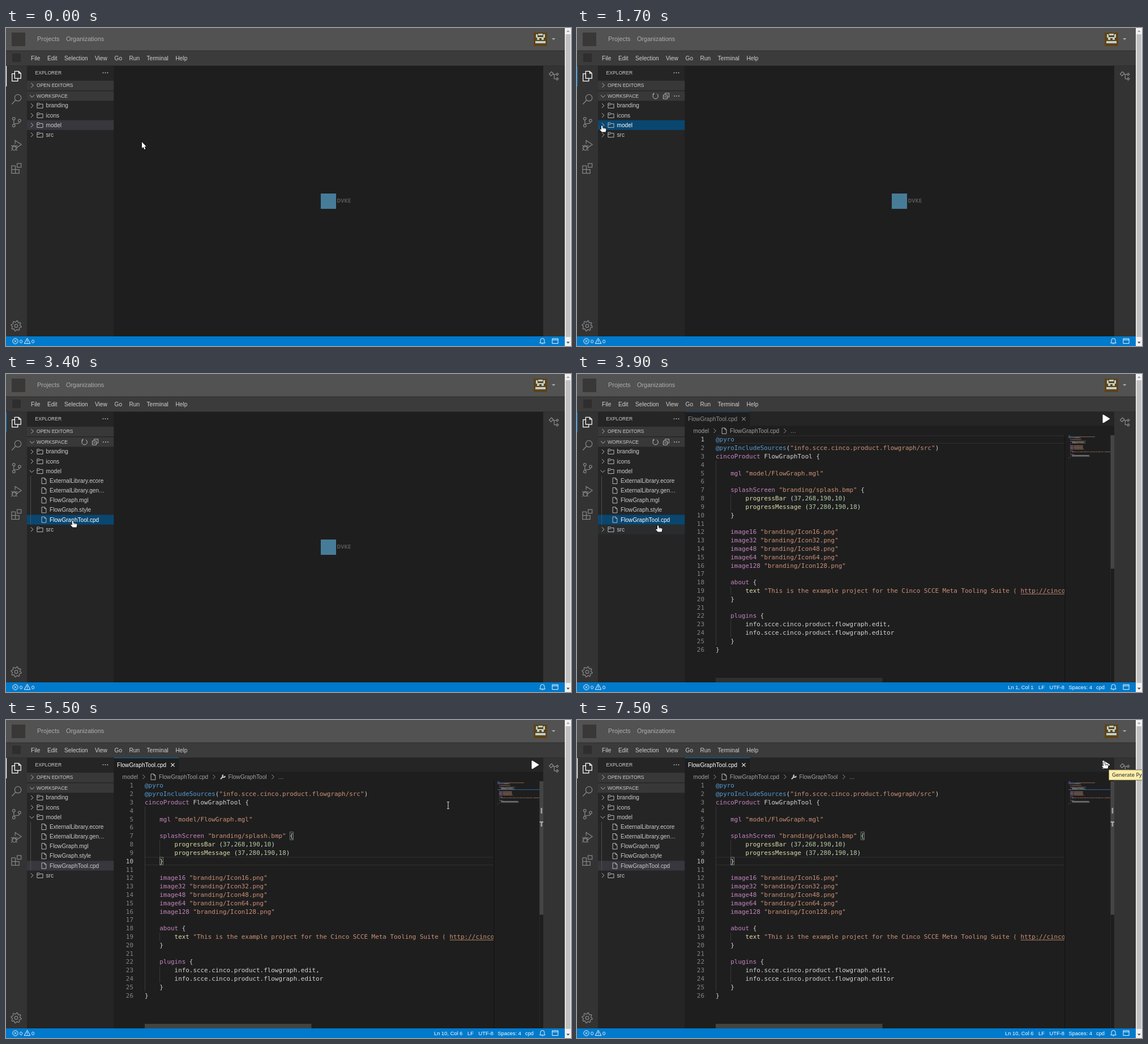
An HTML page with a canvas for the animation above (8 s loop, 998 px wide and 561 px high).

```html
<!DOCTYPE html>
<html lang="en">
<head>
<meta charset="utf-8">
<title>Workspace</title>
<style>
html, body { margin: 0; width: 100%; height: 100%; overflow: hidden; background: #1e1e1e; }
canvas { display: block; width: 998px; height: 561px; }
</style>
</head>
<body>
<canvas id="stage" width="998" height="561"></canvas>
<script>
const ctx = document.getElementById('stage').getContext('2d');
const K = 998 / 1280, LOOP = 8000;
const SANS = '"Liberation Sans", Arial, sans-serif';
const MONO = '"DejaVu Sans Mono", monospace';
const CHAR = 14 * K * 0.602, LINE = 19 * K, ROW = 22 * K;
const CODE_X = 245, CODE_Y = 108.2, TREE_Y = 128.4;

const ICON = {
  right: 'M6 3L11 8L6 13',
  down: 'M3 6L8 11L13 6',
  folder: 'M1.5 2.5h5l1.5 2h6.5v9h-13z M1.5 6.5h5l1.5-2',
  file: 'M3 1.5h6.5L13 5v9.5H3z M9.5 1.5V5H13',
  close: 'M4 4L12 12M12 4L4 12',
  refresh: 'M4.5 3.5A6 6 0 1 0 11 2.9 M4.5 0.5V3.8H1.2',
  collapse: 'M5.5 4.5V1.5h9v9h-3 M1.5 5.5h9v9h-9z M3.5 10h5',
  files: 'M8 1h9l5 4.5V17H8z M17 1v4.5h5 M8 6.5H2V23h13v-6',
  search: 'M8 9a7.3 7.3 0 1 0 14.6 0a7.3 7.3 0 1 0-14.6 0 M10 14.3L1.5 23.5',
  branch: 'M3 4a3 3 0 1 0 6 0a3 3 0 1 0-6 0 M3 20a3 3 0 1 0 6 0a3 3 0 1 0-6 0 M16 8.5a3 3 0 1 0 6 0a3 3 0 1 0-6 0 M6 7v10 M19 11.5c0 4-5 3.5-8 3.7c-3 .2-5 1-5 2',
  debug: 'M9 9V1.5L23 10.5L12 18 M3 17a4 4.5 0 1 1 8 0v2a4 4.5 0 1 1-8 0z M3 15.5h8 M0 12.5l3.5 2.5 M14 12.5l-3.5 2.5 M0 18.5h3 M11 18.5h3 M0 24l3.5-2.5 M14 24l-3.5-2.5',
  blocks: 'M1 6.5h8.5v17H1z M1 15h17v8.5H1z M13.5 1.5H22.5v8.5h-9z',
  tree: 'M1 7l5.5-5l4 4l-5.5 5z M9.5 8h7 M12.5 8v10h4 M16.5 7.5l3-2.5l2.5 2.5l-3 3z M16.5 18l3-2.5l2.5 2.5l-3 3z',
  error: 'M2 8a6 6 0 1 0 12 0a6 6 0 1 0-12 0 M5.5 5.5l5 5M10.5 5.5l-5 5',
  warning: 'M8 1.8L14.8 14H1.2z M8 6v4M8 11.2v1.2',
  bell: 'M2 12.5h12L12.5 10V6.5a4.5 4.5 0 0 0-9 0V10z M6.5 13.5a1.6 1.6 0 0 0 3 0',
  panel: 'M1.5 2.5h13v11h-13z M1.5 5.3h13'
};
for (const k in ICON) ICON[k] = new Path2D(ICON[k]);

const ARROW = new Path2D('M0 0V11.3L2.6 8.9L4.5 13.2L6.4 12.3L4.6 8.2H8z');
const HAND = new Path2D('M-1 1Q0 -.8 1.2 1V4.3L6 5Q7.7 5.5 7.5 7L6.6 11.5H-.2L-3.8 7.4Q-3.6 5.8-1 7.2z');
const BEAM = new Path2D('M-2 -6H-.5L0 -5.5L.5 -6H2M0 -5.5V5.5M-2 6H-.5L0 5.5L.5 6H2');

const SOURCE = `@pyro
@pyroIncludeSources("info.scce.cinco.product.flowgraph/src")
cincoProduct FlowGraphTool {

    mgl "model/FlowGraph.mgl"

    splashScreen "branding/splash.bmp" {
        progressBar (37,268,190,10)
        progressMessage (37,280,190,18)
    }

    image16 "branding/Icon16.png"
    image32 "branding/Icon32.png"
    image48 "branding/Icon48.png"
    image64 "branding/Icon64.png"
    image128 "branding/Icon128.png"

    about {
        text "This is the example project for the Cinco SCCE Meta Tooling Suite ( http://cinco.scce.info )"
    }

    plugins {
        info.scce.cinco.product.flowgraph.edit,
        info.scce.cinco.product.flowgraph.editor
    }
}`;

function tokenColor(s) {
  if (s[0] === '"') return '#ce9178';
  if (s[0] === '@') return '#569cd6';
  if (/^\d/.test(s)) return '#b5cea8';
  if (/^(progress\w+|text)$/.test(s)) return '#dcdcaa';
  if (/^(cincoProduct|mgl|splashScreen|image\d+|about|plugins)$/.test(s)) return '#c586c0';
  return '#d4d4d4';
}
const tokens = SOURCE.split('\n').map(line =>
  [...line.matchAll(/"[^"]*"|@?[a-z][\w.]*|\d+|\S/gi)]
    .map(m => ({ s: m[0], col: m.index, color: tokenColor(m[0]) })));

// first step, last step, x, y, ease-out power
const MOVES = [
  [300, 1100, 45, 172, 2], [1200, 1200, 44, 172, 1],
  [1900, 2400, 138, 226, 1.5], [2700, 2700, 116, 257, 1],
  [2800, 2800, 110, 257, 1], [2900, 3100, 118, 259, 1],
  [3800, 3900, 143, 267, 1], [4000, 4400, 540, 267, 1.2],
  [4500, 4700, 599.5, 245, 2], [4900, 4900, 599, 245, 1],
  [5200, 5500, 781, 150.5, 1], [5600, 6600, 931, 74, 2]
];
function pointer(t) {
  let x = 240, y = 201;
  for (const [a, b, nx, ny, e] of MOVES) {
    if (t < a) break;
    const p = 1 - Math.pow(1 - Math.min(1, (t - a + 100) / (b - a + 100)), e);
    x += (nx - x) * p;
    y += (ny - y) * p;
  }
  return { x, y };
}

function rect(x, y, w, h, color) {
  ctx.fillStyle = color;
  ctx.fillRect(x, y, w, h);
}
function text(s, x, cy, px, color, font = SANS, align = 'left', weight = '') {
  const size = px * K;
  ctx.font = `${weight} ${size}px ${font}`;
  ctx.textAlign = align;
  ctx.fillStyle = color;
  ctx.fillText(s, x, cy + size * 0.346);
}
function icon(name, cx, cy, color = '#c5c5c5', box = 16, lw = 1.2) {
  ctx.save();
  ctx.translate(cx, cy);
  ctx.scale(K, K);
  ctx.translate(-box / 2, -box / 2);
  ctx.strokeStyle = color;
  ctx.lineWidth = lw;
  ctx.stroke(ICON[name]);
  ctx.restore();
}
function poly(color, ...p) {
  ctx.fillStyle = color;
  ctx.beginPath();
  for (let i = 0; i < p.length; i += 2) ctx.lineTo(p[i], p[i + 1]);
  ctx.fill();
}
function dots(cx, cy, color = '#c5c5c5') {
  for (const d of [-4, 0, 4]) rect(cx + d - 0.8, cy - 0.8, 1.6, 1.6, color);
}
function gear(cx, cy) {
  ctx.strokeStyle = '#858585';
  ctx.lineWidth = 1.3;
  ctx.beginPath();
  for (let i = 0; i < 32; i++) {
    const a = (i + 0.5) * Math.PI / 16, r = i % 4 < 2 ? 9 : 6.8;
    ctx.lineTo(cx + r * Math.cos(a), cy + r * Math.sin(a));
  }
  ctx.closePath();
  ctx.moveTo(cx + 2.8, cy);
  ctx.arc(cx, cy, 2.8, 0, 7);
  ctx.stroke();
}

function topBars() {
  rect(0, 0, 987, 41, '#525252');
  rect(0, 39.5, 987, 1.5, '#333');
  rect(0, 41, 987, 25.5, '#3b3b3b');
  rect(10, 8, 24, 24, '#3a3737');
  rect(11, 45, 15, 15, '#2f2d2d');
  text('Projects', 55, 19.5, 14, '#adadad');
  text('Organizations', 106, 19.5, 14, '#adadad');
  rect(932, 8, 24, 24, '#5e4319');
  for (const r of [[936, 11, 3, 6], [949, 11, 3, 6], [940, 10, 8, 3], [938, 16, 12, 5], [935, 23, 18, 4]])
    rect(...r, '#bccfc8');
  rect(942, 18, 4, 3, '#5e4319');
  poly('#aaa', 964, 18, 970.5, 18, 967.2, 21.2);
  const menu = { File: 44, Edit: 73, Selection: 103, View: 157, Go: 191.5, Run: 217.5, Terminal: 248.5, Help: 299.5 };
  for (const m in menu) text(m, menu[m], 53.5, 13, '#d0d0d0');
}

function sideBars(focused) {
  rect(0, 66.5, 37, 478, '#333');
  rect(949, 66.5, 38, 478, '#333');
  rect(0, 67, 1.2, 36, focused ? '#007acc' : '#fff');
  icon('files', 18.5, 85, '#fff', 24, 1.6);
  ['search', 'branch', 'debug', 'blocks'].forEach((n, i) =>
    icon(n, 18.5, 125.5 + i * 40.6, '#858585', 24, 1.6));
  gear(18, 525.5);
  icon('tree', 968, 85, '#858585', 24, 1.7);
}

function explorer(t, cur, focused) {
  const open = t >= 1800, inside = cur.x < 190 && cur.y > 67;
  rect(37, 66.5, 153.3, 478, '#252526');
  text('EXPLORER', 51.5, 79, 11, '#ccc');
  dots(175.5, 79);
  rect(37, 93, 153.3, 17, '#383839');
  rect(37, 111.5, 153.3, 16.9, '#383839');
  icon('right', 46, 101);
  icon('down', 46, 120);
  text('OPEN EDITORS', 54, 101.3, 11, '#ccc');
  text('WORKSPACE', 54, 120, 11, '#ccc');
  if (inside) {
    icon('refresh', 138.5, 120);
    icon('collapse', 157.5, 120);
    dots(176, 120);
  }
  const files = ['ExternalLibrary.ecore', 'ExternalLibrary.gen…', 'FlowGraph.mgl', 'FlowGraph.style', 'FlowGraphTool.cpd'];
  const rows = ['branding', 'icons', 'model', ...(open ? files : []), 'src'];
  const picked = t >= 3400 ? 7 : 2;
  const hover = inside ? Math.floor((cur.y - TREE_Y) / ROW) : -1;
  rows.forEach((name, i) => {
    const y = TREE_Y + i * ROW, c = y + ROW / 2, picks = i === picked;
    if (picks) rect(37, y, 153.3, ROW, focused ? '#094771' : '#37373d');
    else if (i === hover) rect(37, y, 153.3, ROW, '#2a2d2e');
    const fg = picks && focused ? '#fff' : '#ccc';
    if (files.includes(name)) {
      icon('file', 67, c);
      text(name, 77, c, 13, fg);
    } else {
      icon(open && name === 'model' ? 'down' : 'right', 45.5, c);
      icon('folder', 60, c);
      text(name, 70.5, c, 13, fg);
    }
  });
  if (open) rect(43, TREE_Y + 3 * ROW, 0.9, 5 * ROW, '#555');
}

function guide(col, from, to) {
  rect(CODE_X + col * CHAR, CODE_Y + (from - 1) * LINE, 0.8, (to - from + 1) * LINE, '#404040');
}

function code(t, active) {
  const current = active ? 10 : 1;
  const top = CODE_Y + (current - 1) * LINE;
  ctx.save();
  ctx.beginPath();
  ctx.rect(190, 108, 671.5, 436);
  ctx.clip();
  rect(CODE_X, top, 617, 1.3, '#2c2c2c');
  rect(CODE_X, top + LINE - 1.3, 617, 1.3, '#2c2c2c');
  guide(0, 4, 25);
  guide(4, 8, 9);
  guide(4, 19, 19);
  guide(4, 23, 24);
  if (active) {
    ctx.lineWidth = 0.8;
    ctx.strokeStyle = '#888';
    for (const [l, c] of [[7, 39], [10, 4]]) {
      const x = CODE_X + c * CHAR, y = CODE_Y + (l - 1) * LINE;
      ctx.fillStyle = 'rgba(0,100,0,.1)';
      ctx.fillRect(x, y, CHAR, LINE);
      ctx.strokeRect(x + 0.4, y + 0.6, CHAR - 0.8, LINE - 1.2);
    }
  }
  tokens.forEach((line, i) => {
    const c = CODE_Y + (i + 0.5) * LINE;
    text(i + 1, 225, c, 14, i + 1 === current ? '#c6c6c6' : '#858585', MONO, 'right');
    for (const k of line) {
      const x = CODE_X + k.col * CHAR;
      text(k.s, x, c, 14, k.color, MONO);
      const url = k.s.indexOf('http');
      if (url > 0) rect(x + url * CHAR, c + 5.4, 22 * CHAR, 0.9, k.color);
    }
  });
  if (active && Math.floor((t - 5000) / 500) % 2 === 0)
    rect(CODE_X + 5 * CHAR - 0.6, top, 1.5, LINE, '#aeafad');
  ctx.restore();

  rect(861, 108, 1.5, 436, '#151515');
  if (active) rect(868, 122, 74, 1.5, '#264f78');
  ctx.globalAlpha = 0.6;
  tokens.forEach((line, i) => {
    for (const k of line)
      for (const w of k.s.matchAll(/\S+/g)) {
        const x = 868 + (k.col + w.index) * K;
        if (x < 942) rect(x, 108.7 + i * 1.56, Math.min(w[0].length * K, 942 - x), 1, k.color);
      }
  });
  ctx.globalAlpha = 1;
}

function editor(t, cur, active) {
  const fg = active ? '#fff' : '#8f8f8f';
  rect(190.3, 66.5, 759, 24.8, '#252526');
  rect(190.3, 66.5, 115, 24.8, '#1e1e1e');
  rect(190.3, 66.3, 115, 1, active ? '#007acc' : '#0b4a73');
  text('FlowGraphTool.cpd', 196, 79.3, 13, fg);
  icon('close', 294.5, 79.3, fg, 16, 1.3);
  poly('#fff', 928.5, 72, 930, 71.8, 941, 78.5, 941, 79.5, 930, 86.3, 928.5, 86);
  if (t < 3700) return;
  const grey = '#a0a0a0';
  text('model', 205.5, 100.3, 13, grey);
  icon('right', 243, 100.3, grey);
  icon('file', 260, 100.3);
  text('FlowGraphTool.cpd', 270, 100.3, 13, grey);
  icon('right', 367, 100.3, grey);
  if (active) {
    ctx.strokeStyle = '#c5c5c5';
    ctx.lineWidth = 2.2;
    ctx.beginPath();
    ctx.moveTo(379, 104.3);
    ctx.lineTo(383.5, 99.8);
    ctx.stroke();
    ctx.beginPath();
    ctx.arc(384.6, 98.8, 2.2, 0, 4.4);
    ctx.stroke();
    text('FlowGraphTool', 392.5, 100.3, 13, grey);
    icon('right', 471, 100.3, grey);
  }
  text('…', active ? 480.5 : 377, 100.3, 13, grey);
  code(t, active);
  const over = cur.x > 190 && cur.y > 108;
  rect(942, 108, 0.8, 436, '#2b2b2b');
  rect(942.5, 108, 6.8, 235.5, '#454545');
  rect(245, 536, 294.5, 8, over || active ? '#434343' : '#2f2f2f');
  if (active) {
    rect(944.6, 155, 2.6, 10, '#a0a0a0');
    rect(944.6, 179, 2.6, 9, '#a0a0a0');
    rect(942.5, 179, 7, 1.8, '#b8b8b8');
  }
}

function emptyView() {
  rect(556, 292, 27, 27, '#477c98');
  text('DVKE', 584.5, 305.3, 10.4, '#555', '"DejaVu Sans", sans-serif', 'left', 'bold');
}

function statusBar(t, active) {
  rect(0, 544, 987, 17, '#007acc');
  icon('error', 16.5, 552.5, '#fff');
  text('0', 24, 552.7, 12, '#fff');
  icon('warning', 37.5, 552, '#fff');
  text('0', 45, 552.7, 12, '#fff');
  icon('bell', 947.5, 552.3, '#fff');
  icon('panel', 970, 552.3, '#fff');
  if (t < 3700) return;
  text(active ? 'Ln 10, Col 6' : 'Ln 1, Col 1', 806.5, 552.7, 12, '#fff', SANS, 'right');
  const items = { LF: 815, 'UTF-8': 834.5, 'Spaces: 4': 868.5, cpd: 917 };
  for (const s in items) text(s, items[s], 552.7, 12, '#fff');
}

function scrollBar() {
  rect(987, 0, 11, 561, '#f1f1f1');
  rect(988.5, 11, 8.5, 534, '#c1c1c1');
  poly('#a3a3a3', 989.8, 7, 995.8, 7, 992.8, 3.8);
  poly('#505050', 989.8, 553.5, 995.8, 553.5, 992.8, 556.7);
}

function drawPointer(cur, edit) {
  const { x, y } = cur;
  const inText = edit && x > CODE_X && x < 861 && y > 108;
  const hand = (x < 190 && y > 128) || (x > 922 && y < 90);
  ctx.save();
  ctx.translate(x, y);
  ctx.lineJoin = 'round';
  if (inText) {
    ctx.strokeStyle = '#e8e8e8';
    ctx.lineWidth = 1;
    ctx.stroke(BEAM);
  } else {
    const shape = hand ? HAND : ARROW;
    ctx.strokeStyle = '#000';
    ctx.lineWidth = 1.4;
    ctx.stroke(shape);
    ctx.fillStyle = '#fff';
    ctx.fill(shape);
    if (hand) for (const fx of [1.6, 3.5, 5.4]) rect(fx, 5, 0.5, 2.2, '#555');
  }
  ctx.restore();
}

function tooltip() {
  rect(939, 87.5, 59, 19, '#55502f');
  rect(939.8, 88.3, 59, 17.4, '#fbeeab');
  text('Generate Py', 945, 97, 11.8, '#222', '"Noto Sans", "Open Sans", sans-serif');
}

function draw(time) {
  const t = Math.floor((time % LOOP) / 100) * 100;
  const cur = pointer(t);
  const edit = t >= 3600, active = t >= 5100;
  const focused = t >= 1700 && !active;
  rect(0, 0, 998, 561, '#1e1e1e');
  topBars();
  if (edit) editor(t, cur, active);
  else emptyView();
  sideBars(focused);
  explorer(t, cur, focused);
  statusBar(t, active);
  scrollBar();
  if (t >= 7100) tooltip();
  drawPointer(cur, edit);
}

let start;
function tick(now) {
  start ??= now;
  draw(now - start);
  requestAnimationFrame(tick);
}
requestAnimationFrame(tick);
</script>
</body>
</html>
```
